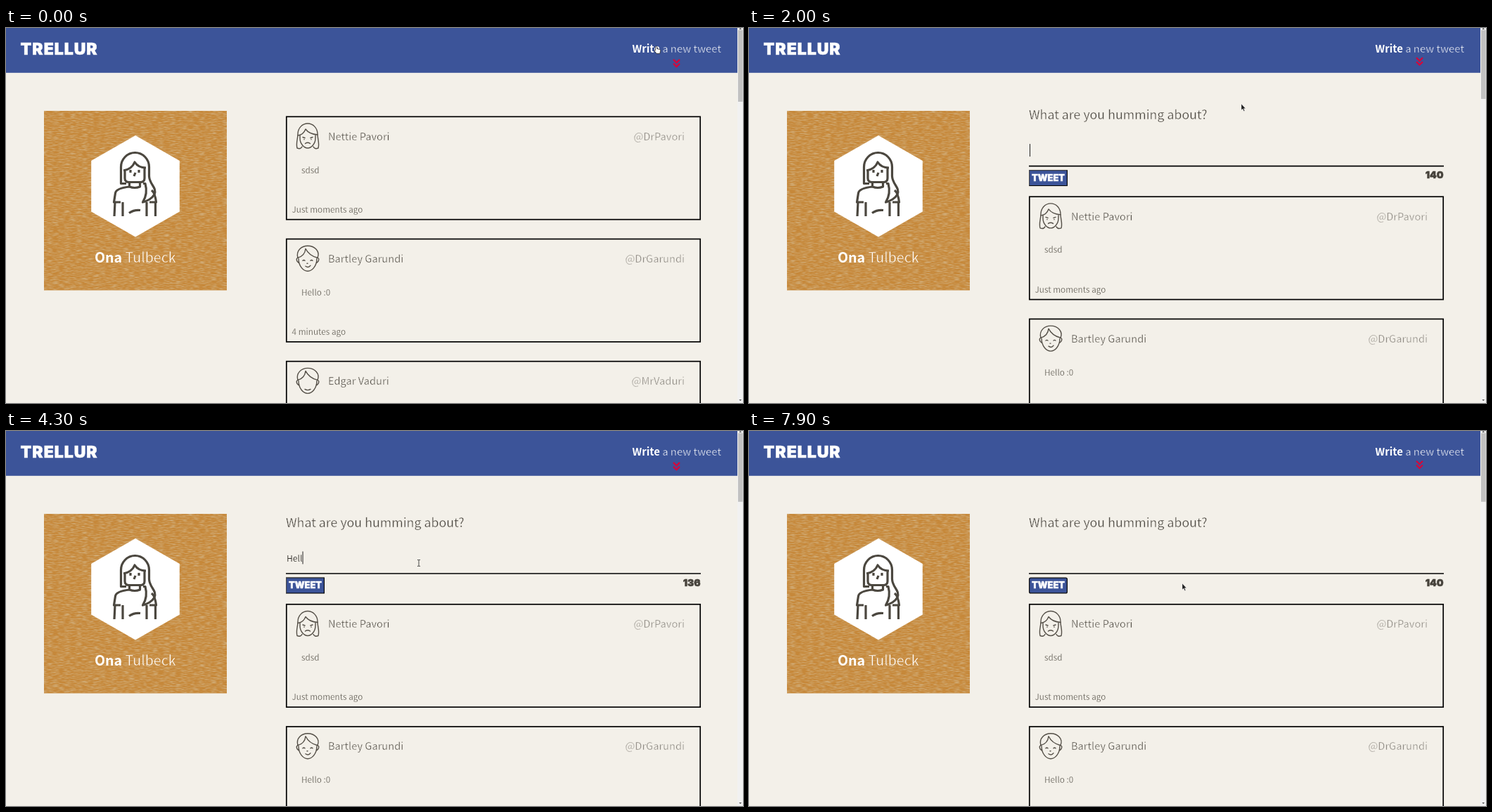
An HTML page that plays this animation: 1048 px wide and 534 px high, repeating every 8 s.

```html
<!DOCTYPE html>
<html lang="en">
<head>
<meta charset="utf-8">
<title>Short message board</title>
<style>
  html, body { margin: 0; width: 100%; height: 100%; overflow: hidden; background: #f3f0e9; }
  svg { display: block; width: 1048px; height: 534px; }
  /* a stroke in the ground colour thins the letters */
  text { font-family: "Noto Sans CJK JP", "Noto Sans CJK SC", "Noto Sans", sans-serif; font-weight: 300; white-space: pre; stroke: #f3f0e9; stroke-width: .4; }
  .b { font-weight: 700; stroke: none; }
  .block { font-family: Inter, "Lato", sans-serif; font-weight: 900; stroke-width: .5; }
  .light { fill: #fff; stroke: #fff; }
  .line { fill: none; stroke: #544f47; stroke-width: 1.4; stroke-linecap: round; stroke-linejoin: round; }
  .name { font-size: 14.65px; fill: #4b473f; }
  .handle { font-size: 14.65px; fill: #87837c; text-anchor: end; }
  .small { font-size: 11.75px; fill: #5a564d; stroke-width: .25; }
</style>
</head>
<body>
<svg viewBox="0 0 1048 534">
  <defs>
    <filter id="grain" x="0" y="0" width="100%" height="100%">
      <feTurbulence type="fractalNoise" baseFrequency=".12 .7" numOctaves="2" seed="4"/>
      <feColorMatrix values="0 0 0 0 .69  0 0 0 0 .56  0 0 0 0 .36  1.4 0 0 0 -.55"/>
    </filter>
    <clipPath id="fold"><rect id="foldBox" x="390" y="100" width="610" height="0"/></clipPath>
    <g id="girl" class="line">
      <path d="M-8 15Q-10 19-15 17C-17 10-14 4-14-3A14 15 0 0 1 14-3C14 4 17 10 15 17Q10 19 8 15"/>
      <path d="M-11-2V3C-11 11-5 17 0 17S11 11 11 3V-2M-14-1Q-6-2-3-10Q2-3 14-2"/>
      <path d="M-7 1.500l3 1M7 1.500l-3 1M-5 4.500v.3M5 4.500v.3M-3.500 10.500Q0 8 3.500 10.500"/>
    </g>
    <g id="boy" class="line">
      <path d="M-13 0C-13 11-6 18 0 18S13 11 13 0M-14-1q-3 1-1 5l2 2M14-1q3 1 1 5l-2 2"/>
      <path d="M-14-1C-17-11-9-18 0-18C10-18 18-10 14-1M-14-1Q-4-4-3-14Q2-4 14-1"/>
    </g>
    <path id="wink" class="line" d="M-7 3q1.500-1.500 3 0M4 3q1.500-1.500 3 0M-1 7h1M-3 11Q1 14 4 10"/>
    <path id="smile" class="line" d="M-4 12Q0 14.500 4 12"/>
  </defs>

  <g id="cards"></g>

  <g id="formClip" clip-path="url(#fold)">
    <g id="form">
      <text x="398" y="136.500" font-size="17.8" fill="#47433c">What are you humming about?</text>
      <text id="typed" x="399" y="185.500" font-size="12.2" fill="#2b2924" style="stroke-width:.2"></text>
      <path id="caret" d="M0 171.500v18" stroke="#222"/>
      <path d="M398 203h590" stroke="#000" stroke-width="1.700"/>
      <g id="plain">
        <rect x="398" y="208.500" width="55" height="23" fill="#000"/>
        <path d="M398 231.500v-23h55l-1.100 1.100h-52.800v20.800z" fill="#4c4c4c"/>
        <rect x="399.100" y="209.600" width="52.800" height="20.800" fill="#3c5499"/>
      </g>
      <rect id="focus" x="398.600" y="209.100" width="53.800" height="21.800" rx="2" fill="#3c5499" stroke="#111" stroke-width="1.300"/>
      <text class="block light" x="425.500" y="224.200" font-size="12.8" text-anchor="middle">TWEET</text>
      <text id="count" class="block" x="987.500" y="220.500" font-size="13.8" fill="#46423b" style="stroke:#46423b" text-anchor="end"></text>
    </g>
  </g>

  <g>
    <rect x="54" y="118" width="260" height="255.500" fill="#c6883a"/>
    <rect x="54" y="118" width="260" height="255.500" filter="url(#grain)"/>
    <path d="M184 153l62.800 36v72.500L184 297.500l-62.800-36V189z" fill="#fff"/>
    <g class="line" style="stroke:#4b473f;stroke-width:3.2;stroke-linecap:butt">
      <path d="M171 221.500H163.500V198A20 20.500 0 0 1 203.500 198V211C204 223 215 227 211 237Q206 245 194.500 248Q202 236 198 221.500H195"/>
      <path d="M169 202V214Q169 219.500 175 219.500H191Q197 219.500 197 214V199M167 203Q179 201 183 191Q188 199 199 199"/>
      <path d="M175.500 220v6Q183 229 190.500 226V220M175.500 226Q157 228 155.500 235L153.500 248H163M155 248L154 268M166 248V268M207 231Q212 235 213.500 248H204M212.500 248V268M200 248V268M175 263.500Q182 258.500 191 259.500M177 202v4M189 202v4M184 206l-2 5"/>
    </g>
    <text x="183.700" y="334.300" font-size="19.6" fill="#fff" style="stroke:#c6883a" text-anchor="middle"><tspan class="b">Ona</tspan> Tulbeck</text>
  </g>

  <rect width="1040" height="63.800" fill="#3c5499"/>
  <text class="block light" x="20.500" y="38.200" font-size="23" letter-spacing="1">TRELLUR</text>
  <text x="1017" y="34.700" font-size="14.9" fill="#fff" style="stroke:#3c5499" text-anchor="end"><tspan class="b">Write</tspan> a new tweet</text>
  <path id="chevrons" d="M-4.500-5L0-.5L4.500-5M-4.500.8L0 5.200L4.500.8" fill="none" stroke="#d3083c" stroke-width="2.300"/>

  <rect x="1040" width="8" height="534" fill="#f1f1f1"/>
  <rect id="thumb" x="1041" y="3" width="6.500" fill="#c1c1c1"/>
  <path d="M1042.300 2l1.900-2 1.900 2zM1042.300 529l1.900 2 1.900-2z" fill="#505050"/>

  <g id="cursor">
    <path id="hand" d="M-2.500-4.500q1.200-1.200 2.200 0v3l4 1q1.200.5 1 2l-1 4h-4.500l-3.200-4q0-1.400 1.500-.6z" fill="#fff" stroke="#222" stroke-width=".8"/>
    <path id="arrow" d="M0 0V9L2 7.200L3.600 10.600L5 9.900L3.500 6.700H6.200Z" fill="#1d1d1d" stroke="#fff" stroke-width=".5"/>
    <path id="beam" d="M-2-4.500h1.500l.5.5.5-.5H2M0-4V4M-2 4.500h1.500l.5-.5.5.5H2" fill="none" stroke="#333" stroke-width=".9"/>
  </g>
</svg>
<script>
const LOOP = 8000, STEP = 100;
const MESSAGE = "Hello world!";
const KEYS = [3500, 3600, 4000, 4200, 4600, 4700, 4800, 4900, 5000, 5100, 5200, 5400];
const OPEN = 1610, OPENED = 2050, FOCUS = 2000, PRESS = 6500, CLEAR = 7500;

// time, x, y
const PATH = [
  [0, 926, 31], [700, 926, 31], [1300, 938, 33], [1700, 938, 33], [1800, 900, 50],
  [2000, 700, 108], [2600, 587, 188], [5500, 587, 188], [5800, 525, 215],
  [6300, 436, 227], [6600, 434, 218], [7200, 434, 218], [7900, 616, 217]
];

const POSTS = [
  ["Nettie Pavori", "@DrPavori", "sdsd", "Just moments ago", ["girl"]],
  ["Bartley Garundi", "@DrGarundi", "Hello :0", "4 minutes ago", ["boy", "wink"]],
  ["Edgar Vaduri", "@MrVaduri", "", "", ["boy", "smile"]]
];

const $ = id => document.getElementById(id);
const move = (id, x, y) => $(id).setAttribute("transform", `translate(${x} ${y})`);
const show = (id, on) => $(id).setAttribute("visibility", on ? "inherit" : "hidden");
const clamp = v => Math.max(0, Math.min(1, v));
const swing = p => .5 - Math.cos(clamp(p) * Math.PI) / 2;

$("cards").innerHTML = POSTS.map(([name, handle, body, age, parts], i) => `
  <g transform="translate(398 ${125.5 + i * 174.2})">
    <rect x=".8" y=".8" width="588.4" height="146.400" fill="none" stroke="#000" stroke-width="1.700"/>
    <g transform="translate(31 28.500)">${parts.map(p => `<use href="#${p}"/>`).join("")}</g>
    <text class="name" x="60" y="34.300">${name}</text>
    <text class="handle" x="567" y="34.300">${handle}</text>
    <text class="small" x="22" y="81">${body}</text>
    <text class="small" x="8.500" y="137.300">${age}</text>
  </g>`).join("");

function pointer(t) {
  const i = PATH.findIndex(p => p[0] > t);
  if (i < 0) return PATH[PATH.length - 1].slice(1);
  const [t0, x0, y0] = PATH[i - 1], [t1, x1, y1] = PATH[i];
  const k = swing((t - t0) / (t1 - t0));
  return [x0 + (x1 - x0) * k, y0 + (y1 - y0) * k];
}

function drawPointer(t) {
  const [x, y] = pointer(t);
  const open = t > FOCUS;
  const onLink = x > 885 && y < 45;
  const onButton = open && x < 453 && y > 208 && y < 231;
  const onField = open && y > 160 && y < 203;
  move("cursor", x, y);
  show("hand", onLink || onButton);
  show("beam", onField);
  show("arrow", !onLink && !onButton && !onField);
}

function drawForm(t) {
  const done = t >= OPENED;
  const grow = swing((t - OPEN) / 400);
  const shift = done ? 120.5 : 114.1 * grow;
  move("cards", 0, shift);
  move("form", 0, done ? 0 : -6.4);
  show("formClip", t > OPEN);
  $("foldBox").setAttribute("height", done ? 140 : 12 + 114 * grow);
  $("thumb").setAttribute("height", 102 - shift * .035);

  const pressed = KEYS.filter(k => k <= t);
  const text = t < CLEAR ? MESSAGE.slice(0, pressed.length) : "";
  $("typed").textContent = text;
  $("count").textContent = 140 - text.length;
  const last = pressed.length ? pressed[pressed.length - 1] : FOCUS;
  show("caret", t >= FOCUS && t < PRESS && (t - last) % 1000 < 500);
  move("caret", 399.5 + (text ? $("typed").getComputedTextLength() : 0), 0);

  show("plain", t < PRESS);
  show("focus", t >= PRESS);
}

function draw(now) {
  const t = Math.floor(now % LOOP / STEP) * STEP;
  move("chevrons", 953.5, 48.5 + 1.5 * Math.cos(2 * Math.PI * (t / 1500 + .07)));
  drawForm(t);
  drawPointer(t);
}

const start = performance.now();
function tick() {
  draw(performance.now() - start);
  requestAnimationFrame(tick);
}
tick();
</script>
</body>
</html>
```
